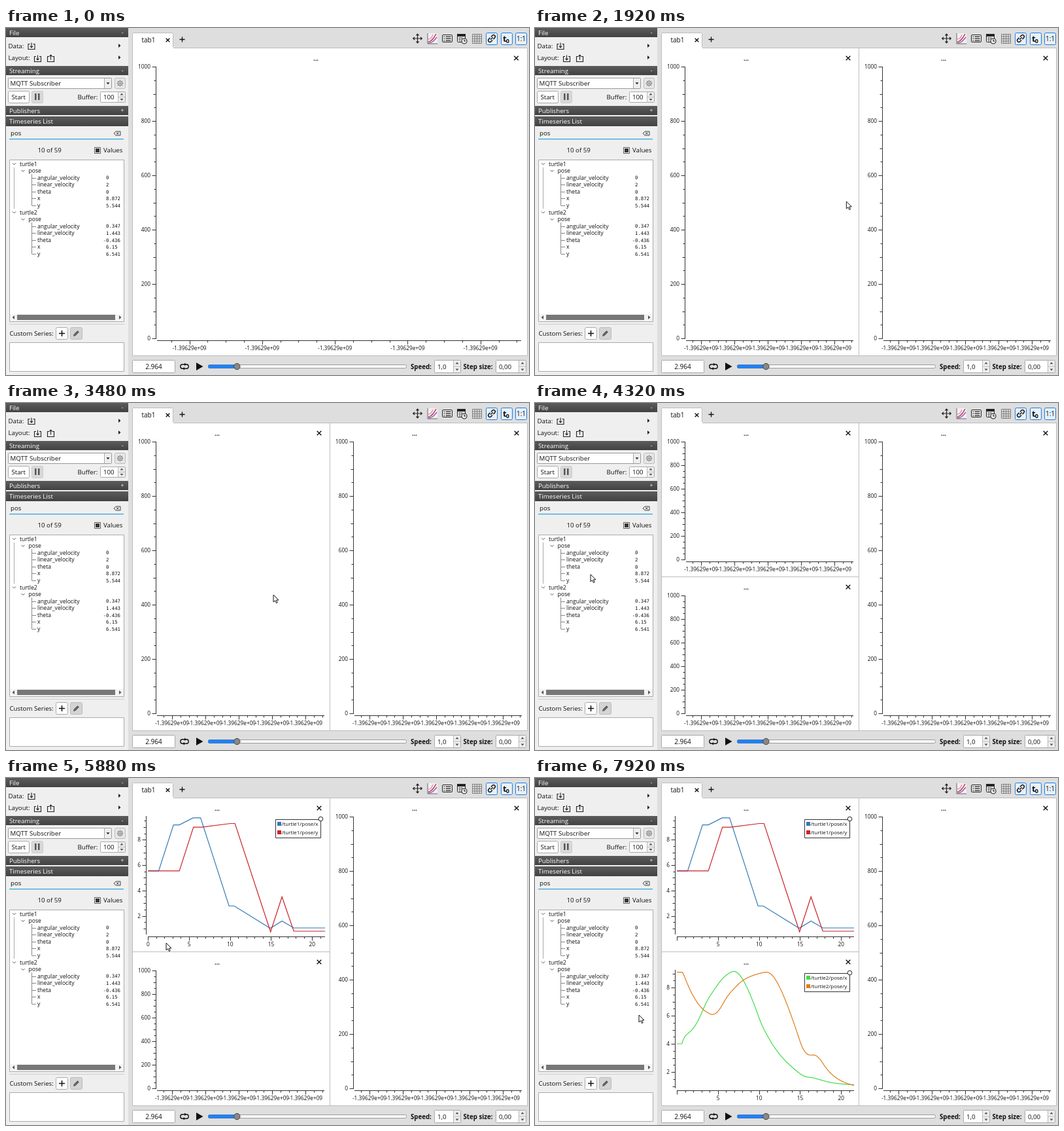
Write an HTML page with a canvas that moves like this. It is 800 by 530 pixels and loops after 8000 ms.

```html
<!DOCTYPE html>
<html lang="en">
<head>
<meta charset="utf-8">
<title>Plot layout demo</title>
<style>
html, body { margin: 0; width: 100%; height: 100%; overflow: hidden; background: #dedede; }
canvas { display: block; }
</style>
</head>
<body>
<canvas id="stage" width="800" height="530"></canvas>
<script>
const g = document.getElementById('stage').getContext('2d');
const LOOP = 8000, STEP = 120;
const SANS = '"Open Sans", "Noto Sans", sans-serif', MONO = '"DejaVu Sans Mono", monospace';
const INK = '#101010', SELECT = '#66cbff', BLUE = '#1a7fe8';

function text(s, x, y, { size = 9.7, color = INK, align = 'left', weight = 400, family = SANS } = {}) {
  g.font = `${weight} ${size}px ${family}`;
  g.fillStyle = color;
  g.textAlign = align;
  g.fillText(s, x, y);
}

function rect(x, y, w, h, fill) {
  g.fillStyle = fill;
  g.fillRect(x, y, w, h);
}

function box(x, y, w, h, fill = '#fff', stroke = '#aaa', r = 0) {
  g.beginPath();
  g.roundRect(x + .5, y + .5, w, h, r);
  g.fillStyle = fill;
  g.fill();
  g.strokeStyle = stroke;
  g.lineWidth = 1;
  g.stroke();
}

function line(x1, y1, x2, y2, color = '#333', width = 1) {
  g.beginPath();
  g.moveTo(x1, y1);
  g.lineTo(x2, y2);
  g.strokeStyle = color;
  g.lineWidth = width;
  g.stroke();
}

// Path drawn around (x, y); pass a fill to paint it as a solid.
function icon(d, x, y, color = '#222', width = 1.1, fill) {
  g.save();
  g.translate(x, y);
  const path = new Path2D(d);
  if (fill) { g.fillStyle = fill; g.fill(path); }
  if (width) { g.strokeStyle = color; g.lineWidth = width; g.stroke(path); }
  g.restore();
}

const cross = (x, y, r = 3.3) => icon(`M${-r} ${-r}L${r} ${r}M${r} ${-r}L${-r} ${r}`, x, y, '#111', 1.4);
const plus = (x, y, r = 4, w = 1.3) => icon(`M${-r} 0H${r}M0 ${-r}V${r}`, x, y, '#111', w);
const triangle = (x, y, d, color = '#222') => icon(d, x, y, color, 0, color);
const PENCIL = 'M-4 4L-3.2 1L2 -4L4 -2L-1.2 3.2Z';
const ARROWS_H = 'M-4.5 0H4.5M-2.8 -1.8L-4.6 0L-2.8 1.8M2.8 -1.8L4.6 0L2.8 1.8';
const ARROWS_V = 'M0 -4.5V4.5M-1.8 -2.8L0 -4.6L1.8 -2.8M-1.8 2.8L0 4.6L1.8 2.8';
const DOWN = 'M-2.5 -1.2H2.5L0 1.8Z', UP = 'M-2.5 1.2H2.5L0 -1.8Z';
const RIGHT = 'M-1.5 -3V3L2 0Z', LEFT = 'M1.5 -3V3L-2 0Z';

function header(label, y, h, mark) {
  const shade = g.createLinearGradient(0, y, 0, y + h);
  shade.addColorStop(0, '#5c5c5c');
  shade.addColorStop(1, '#424242');
  rect(0, y, 187, h, shade);
  text(label, 5, y + h / 2 + 3.7, { color: '#fff' });
  if (mark) text(mark, 178, y + h / 2 + 3, { color: '#fff', align: 'center', size: 8.5 });
}

function spin(x, y, w, h, value, size) {
  box(x, y, w, h, '#fff', '#aaa', 1);
  rect(x + w - 10, y + 1, 10, h - 1, '#eee');
  line(x + w - 10.5, y + 1, x + w - 10.5, y + h, '#bbb');
  line(x + w - 10, y + h / 2 + .5, x + w, y + h / 2 + .5, '#bbb');
  triangle(x + w - 5, y + h * .27, UP, '#555');
  triangle(x + w - 5, y + h * .77, DOWN, '#555');
  text(value, x + 5, y + h / 2 + 4.2, { size });
}

const GROUPS = [
  ['turtle1', ['0', '2', '0', '8.872', '5.544']],
  ['turtle2', ['0.347', '1.443', '-0.436', '6.15', '6.541']],
];
const FIELDS = ['angular_velocity', 'linear_velocity', 'theta', 'x', 'y'];
const rowY = i => 207.5 + 10.58 * i;

function tree(selected) {
  box(5, 201, 175, 247);
  for (const i of selected) rect(47, Math.round(rowY(i) - 5.3), 133, 11, SELECT);
  if (selected.length) {
    const y = Math.round(rowY(selected[selected.length - 1]) + 5) + .5;
    g.setLineDash([1, 1]);
    line(47, y, 180, y, '#357');
    g.setLineDash([]);
  }
  line(12.5, 213, 12.5, 276, '#aaa');
  GROUPS.forEach(([name, values], n) => {
    const top = n * 7, label = { size: 8.6 };
    icon('M-2.5 -1.2L0 1.3L2.5 -1.2', 12.5, rowY(top), '#555', 1);
    icon('M-2.5 -1.2L0 1.3L2.5 -1.2', 26, rowY(top + 1), '#555', 1);
    text(name, 21, rowY(top) + 3.2, label);
    text('pose', 34.5, rowY(top + 1) + 3, label);
    line(39.5, rowY(top + 1) + 5, 39.5, rowY(top + 6), '#888');
    FIELDS.forEach((field, k) => {
      const y = rowY(top + 2 + k);
      line(39.5, Math.round(y) + .5, 46, Math.round(y) + .5, '#888');
      text(field, 48, y + 3, label);
      const minus = values[k][0] === '-';
      text(values[k], minus ? 148.5 : 153, y + 2.7, { size: 7.3, family: MONO });
    });
  });
  rect(6, 437, 174, 11, '#f4f4f4');
  rect(17, 438, 150, 8, '#777');
  triangle(11.5, 442, LEFT, '#555');
  triangle(174.5, 442, RIGHT, '#555');
}

function sidebar(selected) {
  rect(0, 0, 187, 530, '#efefef');
  header('File', 0, 14, '-');
  header('Streaming', 58, 14, '-');
  header('Publishers', 119, 14, '+');
  header('Timeseries List', 135, 15);

  text('Data:', 3.5, 30.7);
  text('Layout:', 3.5, 49.2);
  const tray = 'M-2.5 -3H-5V5H5V-3H2.5';
  icon(tray + 'M0 -5V2M-2.2 0L0 2.4L2.2 0', 39, 27.5);
  icon(tray + 'M0 -5V2M-2.2 0L0 2.4L2.2 0', 48.5, 46.5);
  icon(tray + 'M0 2V-5M-2.2 -3L0 -5.4L2.2 -3', 68.5, 46.5);
  triangle(173.5, 27, RIGHT);
  triangle(173.5, 45, RIGHT);

  box(3, 76, 158, 16, '#fff', '#999', 1);
  line(150.5, 77, 150.5, 92, '#aaa');
  rect(151, 77, 10, 15, '#eee');
  triangle(156, 84.5, DOWN);
  text('MQTT Subscriber', 6.5, 87.8);
  box(166, 76, 16, 16, '#e6e6e6', '#bbb', 2);
  icon('M3.2 0A3.2 3.2 0 1 1 -3.2 0A3.2 3.2 0 1 1 3.2 0M1.2 0A1.2 1.2 0 1 1 -1.2 0A1.2 1.2 0 1 1 1.2 0', 174.5, 84.5, '#888');
  for (let k = 0; k < 8; k++) {
    const a = k * Math.PI / 4, c = Math.cos(a), s = Math.sin(a);
    line(174.5 + 3.2 * c, 84.5 + 3.2 * s, 174.5 + 4.8 * c, 84.5 + 4.8 * s, '#888', 1.3);
  }
  box(3, 96, 32, 18, '#fff', '#aaa', 2);
  text('Start', 8.5, 108.8);
  box(39, 96, 17, 18, '#d9d9d9', '#ccc', 2);
  rect(44, 100, 2.5, 10, '#555');
  rect(49, 100, 2.5, 10, '#555');
  text('Buffer:', 109.5, 108.8);
  spin(144, 97, 38, 16, '100', 9.7);

  rect(5, 169, 175, 1.3, '#36a9e0');
  text('pos', 7, 164.2);
  icon('M-5 0L-2 -3H5V3H-2ZM-1 -1.5L2.5 1.5M2.5 -1.5L-1 1.5', 170, 161, '#444', 1);
  text('10 of 59', 48.5, 190);
  box(135, 182, 9, 9, '#fff', '#555');
  rect(137, 184, 6, 6, '#333');
  text('Values', 149, 190);

  tree(selected);
  line(5, 452.5, 181, 452.5, '#ccc');
  text('Custom Series:', 5.5, 470);
  box(76, 457, 18, 18, '#fff', '#aaa', 2);
  plus(85.5, 466.5, 4.5, 1.5);
  box(98, 457, 18, 18, '#d4d4d4', '#bbb', 2);
  icon(PENCIL, 107.5, 466.5, '#555', .8, '#666');
  box(5, 480, 175, 44);
}

function toolbar() {
  icon('M0 -6V6M-6 0H6M-2 -4.5L0 -6.8L2 -4.5M-2 4.5L0 6.8L2 4.5M-4.5 -2L-6.8 0L-4.5 2M4.5 -2L6.8 0L4.5 2', 629.5, 16, '#222', 1.2);
  rect(645, 8, 15, 16, '#f4eef2');
  icon('M-7 -8V8H8', 652, 16, '#666', 1);
  icon('M-6 5C-2 5 1 2 6 -7', 652, 16, '#c0305a', 1.4);
  icon('M-6 7C0 7 3 3 7 -2', 652, 16, '#8c5db0', 1.4);
  icon('M-6 1C-2 1 -1 -1 1 -6', 652, 16, '#e28a9a', 1.2);
  box(667, 10, 15, 11, '#eee', '#222', 1.5);
  for (let k = 0; k < 3; k++) {
    rect(669.5, 12.7 + k * 3, 1.5, 1.3, '#222');
    rect(672.5, 12.7 + k * 3, 8, 1.3, '#222');
  }
  box(690, 9, 12, 12, '#eee', '#222', 1);
  rect(690, 9, 13, 4, '#222');
  icon('M-3 -2H4M-3 1H1M-1 -3V4M2 -3V1', 695, 17, '#555', .8);
  icon('M4 0A4 4 0 1 1 -4 0A4 4 0 1 1 4 0M0 -2.5V0H2', 701, 20, '#222', 1.1, '#eee');
  icon('M-7 -7H7V7H-7ZM-7 -3.5H7M-7 0H7M-7 3.5H7M-3.5 -7V7M0 -7V7M3.5 -7V7', 720.5, 16.5, '#777', .9);
  for (const x of [734, 757, 779]) box(x, 7, 17, 18, '#e8f0f8', BLUE, 2);
  g.save();
  g.translate(743, 16);
  g.rotate(-Math.PI / 4);
  icon('M-1 -2.5H-4A2.5 2.5 0 0 0 -4 2.5H-1M1 -2.5H4A2.5 2.5 0 0 1 4 2.5H1M-2.5 0H2.5', 0, 0, '#222', 1.6);
  g.restore();
  text('t', 760, 20.5, { size: 13, weight: 700 });
  text('0', 764.8, 22.5, { size: 9, weight: 700 });
  text('1:1', 788, 20, { size: 10, align: 'center' });
}

function frame() {
  rect(187, 0, 613, 530, '#dedede');
  box(193, 30, 604, 470, '#fff', '#bdbdbd');
  box(193, 7, 62, 24, '#fff', '#bdbdbd', 1);
  rect(194, 29, 62, 3, '#fff');
  text('tab1', 207.5, 22, { size: 10 });
  cross(247.5, 18.5, 2.8);
  plus(269.5, 17.5);
  toolbar();

  box(193, 507, 65, 19, '#fff', '#aaa', 1);
  text('2.964', 226, 521, { size: 10, align: 'center' });
  icon('M-3 -3.2H3A3.2 3.2 0 0 1 3 3.2H-3A3.2 3.2 0 0 1 -3 -3.2Z', 273, 517, '#111', 1.4);
  triangle(274, 513.8, 'M-1 -2.3V2.3L2 0Z', '#111');
  triangle(272, 520.2, 'M1 -2.3V2.3L-2 0Z', '#111');
  triangle(291, 517, 'M0 -6V6L10.5 0Z', '#111');
  box(309, 514, 303, 5, '#fff', '#999', 2);
  box(309, 514, 43, 5, '#1e82ff', '#3a78bb', 2);
  icon('M4.7 0A4.7 4.7 0 1 1 -4.7 0A4.7 4.7 0 1 1 4.7 0', 353.3, 517, '#444', 1, '#888');
  text('Speed:', 619, 520.8, { weight: 700 });
  spin(655, 507, 40, 19, '1,0', 9.8);
  text('Step size:', 699.5, 520.8, { weight: 700 });
  spin(749, 507, 46, 19, '0,00', 9.8);
}

const small = { size: 8.3 };

function xTicks(first, gap, from, to, y, parts) {
  y += .5;
  line(from, y, to, y);
  const sub = gap / parts;
  for (let k = Math.ceil((from - first) / sub - .05); first + k * sub <= to + .5; k++) {
    const x = Math.round(first + k * sub) + .5;
    line(x, y, x, y + (k % parts ? 3 : 6));
  }
}

function yTicks(x, zero, unit, from, to, minor, major) {
  x += .5;
  line(x, from, x, to);
  for (let k = Math.ceil((zero - to) / unit / minor - .05); zero - k * minor * unit >= from - .5; k++) {
    const v = k * minor, y = Math.round(zero - v * unit) + .5, big = v % major === 0;
    line(x, y, x - (big ? 6 : (v * 2) % major ? 3 : 4), y);
    if (big) text(v, x - 8.5, y + 2.7, { ...small, align: 'right' });
  }
}

function caption(middle, right, y) {
  text('...', middle, y + 4, { size: 9.5, align: 'center', weight: 700 });
  cross(right, y);
}

function emptyPlot(left, top, bottom, wide) {
  const right = wide ? 780.5 : left + 285;
  caption(wide ? 474 : left + 129, right, top - 13);
  const first = wide ? 280.5 : left + 60, gap = wide ? 111.3 : 51;
  yTicks(left + 35, bottom, (bottom - top) / 1000, top, bottom + 1, 50, 200);
  xTicks(first, gap, left + 37, wide ? 788 : left + 293, bottom + 3, 4);
  for (let k = 0; k < 5; k++)
    text('-1.39629e+09', first + k * gap, bottom + 18, { ...small, align: 'center' });
}

// Curves are lists of [seconds, value].
const END = 21.59;
const LEADER = [
  [[0, 5.544], [1.3, 5.544], [3.11, 9.18], [3.82, 9.18], [5.5, 9.73], [6.41, 9.73], [9.88, 2.775],
    [10.52, 2.775], [14.9, 1.018], [16.33, 1.587], [17.77, 1.044], [END, 1.044]],
  [[0, 5.544], [3.82, 5.544], [5.54, 9], [6.53, 9], [10.04, 9.287], [10.6, 9.287], [14.94, .734],
    [16.33, 3.5], [17.77, .785], [END, .785]],
];

function valueAt(points, t) {
  const i = Math.max(1, points.findIndex(p => p[0] >= t));
  const [t0, a] = points[i - 1], [t1, b] = points[i];
  return a + (b - a) * (t - t0) / (t1 - t0);
}

// The second turtle steers towards the first, with new commands ten times a second.
function chase() {
  const start = .6, parts = 5, dt = .1 / parts;
  let x = 4, y = 9.09, theta = 0, speed = 0, turn = 0;
  const xs = [[0, x]], ys = [[0, y]];
  for (let k = 0; start + k * dt <= END; k++) {
    const t = start + k * dt;
    xs.push([t, x]);
    ys.push([t, y]);
    if (k % parts === 0) {
      const dx = valueAt(LEADER[0], t) - x, dy = valueAt(LEADER[1], t) - y;
      const off = Math.atan2(dy, dx) - theta;
      turn = 4 * Math.atan2(Math.sin(off), Math.cos(off));
      speed = .5 * Math.hypot(dx, dy);
    }
    theta += turn * dt;
    x += speed * Math.cos(theta) * dt;
    y += speed * Math.sin(theta) * dt;
  }
  return [xs, ys];
}
const FOLLOWER = chase();

function dataPlot(top, bottom, zero, unit, fromZero, name, curves, colors) {
  caption(323, 479, top - 13);
  yTicks(214, zero, unit, top - 1, bottom, .5, 2);
  xTicks(217, 62.8, 217, 488, bottom + 3, 5);
  for (let v = fromZero ? 0 : 5; v <= 20; v += 5)
    text(v, 217.3 + v * 12.55, bottom + 18, { ...small, align: 'center' });
  curves.forEach((points, k) => {
    g.beginPath();
    for (const [t, v] of points) g.lineTo(217.2 + t * 12.55, zero - v * unit);
    g.strokeStyle = colors[k];
    g.lineWidth = 1.2;
    g.stroke();
  });
  const y = top + 4;
  box(412, y, 69, 28, '#fff', '#333');
  colors.forEach((color, k) => {
    rect(415, y + 4 + k * 13, 6, 6, color);
    text(`/${name}/pose/${'xy'[k]}`, 421.5, y + 10 + k * 13, { size: 8 });
  });
  icon('M3.3 0A3.3 3.3 0 1 1 -3.3 0A3.3 3.3 0 1 1 3.3 0', 481.5, y - .5, '#222', 1, '#fff');
}

function plots(t) {
  if (t < 1800) return emptyPlot(194, 59, 474, true);
  line(495.5, 31, 495.5, 500, '#bdbdbd');
  emptyPlot(496, 59, 474);
  if (t < 3600) return emptyPlot(194, 59, 474);
  line(194, 265.5, 495, 265.5, '#bdbdbd');
  if (t < 5760) emptyPlot(194, 59, 239);
  else dataPlot(59, 239, 249.2, 19.35, t < 7440, 'turtle1', LEADER, ['#2f7ab5', '#cc2229']);
  if (t < 7440) emptyPlot(194, 294, 474);
  else dataPlot(294, 474, 492, 21.5, false, 'turtle2', FOLLOWER, ['#3fdc4a', '#e07b1c']);
}

const STACK = 'M-4 -4H2V2H-4ZM-2 2V4H4V-2H2';
// label, offset from the menu top, icon path, disabled
const ITEMS = [
  ['Edit curve style...', 9.7, PENCIL],
  ['Apply filter to data...', 27.7, '', true],
  ['Split Horizontally', 46.8, 'M-4.5 -4.5H-1V4.5H-4.5ZM1 -4.5H4.5V4.5H1Z'],
  ['Split Vertically', 64.8, 'M-4.5 -4.5H4.5V-1H-4.5ZM-4.5 1H4.5V4.5H-4.5Z'],
  ['Zoom Out', 84, ARROWS_H + ARROWS_V],
  ['Zoom Out Horizontally', 102, ARROWS_H],
  ['Zoom Out Vertically', 120, ARROWS_V],
  ['Remove ALL curves', 139.3, 'M4.7 0A4.7 4.7 0 1 1 -4.7 0A4.7 4.7 0 1 1 4.7 0M-2 -2L2 2M2 -2L-2 2', true],
  ['Copy', 158.5, STACK],
  ['Paste', 176.5, STACK, true],
  ['Copy image to clipboard', 194.5, 'M-4.5 -4.5H4.5V4.5H-4.5ZM-4 1L-2 -2L1 2.5L4 -1.5'],
  ['Save plot to file', 212.3, 'M-4.5 -4.5H4.5V4.5H-4.5ZM-2 -4.5V-1.5H2.5V-4.5M-2.5 4.5V1H2.5V4.5'],
];

function menu(x, y, pointer) {
  box(x, y, 145, 221, '#fcfcfc', '#9a9a9a');
  for (const dy of [37.5, 74.5, 129.5, 149.5]) line(x + 3, y + dy, x + 143, y + dy, '#bbb');
  for (const [label, dy, path, off] of ITEMS) {
    const cy = y + dy, color = off ? '#8c8c8c' : INK;
    if (!off && pointer.x > x + 2 && Math.abs(pointer.y - cy) < 9) rect(x + 1, cy - 9, 144, 18, SELECT);
    if (path) icon(path, x + 8.5, cy, color, 1, path === PENCIL ? INK : undefined);
    else text('fx', x + 4.5, cy + 3.5, { size: 10, color, weight: 'italic 400', family: '"Noto Serif", serif' });
    text(label, x + 18, cy + 3.5, { color });
    const w = g.measureText(label[0]).width;
    line(x + 18, Math.round(cy + 4) + .5, x + 18 + w, Math.round(cy + 4) + .5, color, .8);
  }
}

// time, x, y
const PATH = [
  [120, 130, 300], [960, 457, 223], [1080, 457, 223], [1200, 471, 253], [1440, 486, 269], [1800, 486, 269],
  [2400, 393, 230], [2520, 393, 230], [3120, 409, 293], [3600, 409, 293],
  [4440, 66, 260], [4680, 66, 260], [4920, 66, 270], [5160, 66, 270],
  [5640, 245, 240], [5880, 245, 252], [6480, 62, 334], [6600, 62, 334], [6720, 62, 345], [6840, 62, 345],
  [7320, 260, 400], [7440, 260, 400], [7920, 159, 362],
];

function pointerAt(t) {
  let i = PATH.findIndex(k => k[0] >= t);
  if (i < 0) i = PATH.length - 1;
  const b = PATH[i], a = PATH[i - 1] || b;
  const u = a === b ? 1 : (t - a[0]) / (b[0] - a[0]), e = u * u * (3 - 2 * u);
  return { x: a[1] + (b[1] - a[1]) * e, y: a[2] + (b[2] - a[2]) * e };
}

function selectionAt(t) {
  if (t >= 4560 && t < 5760) return t < 4920 ? [5] : [5, 6];
  if (t >= 6480 && t < 7440) return t < 6720 ? [12] : [12, 13];
  return [];
}

function draw(t) {
  const pointer = pointerAt(t);
  frame();
  sidebar(selectionAt(t));
  plots(t);
  if (t >= 1080 && t < 1680) menu(457, 223, pointer);
  if (t >= 2520 && t < 3480) menu(393, 230, pointer);
  if (t >= 120) icon('M0 0V11L2.6 8.7L4.4 12.6L6.2 11.8L4.5 8H8Z', pointer.x, pointer.y, '#111', 1, '#fff');
}

function tick(now) {
  const t = now % LOOP;
  draw(Math.floor(t / STEP) * STEP);
  requestAnimationFrame(tick);
}
requestAnimationFrame(tick);
</script>
</body>
</html>
```
